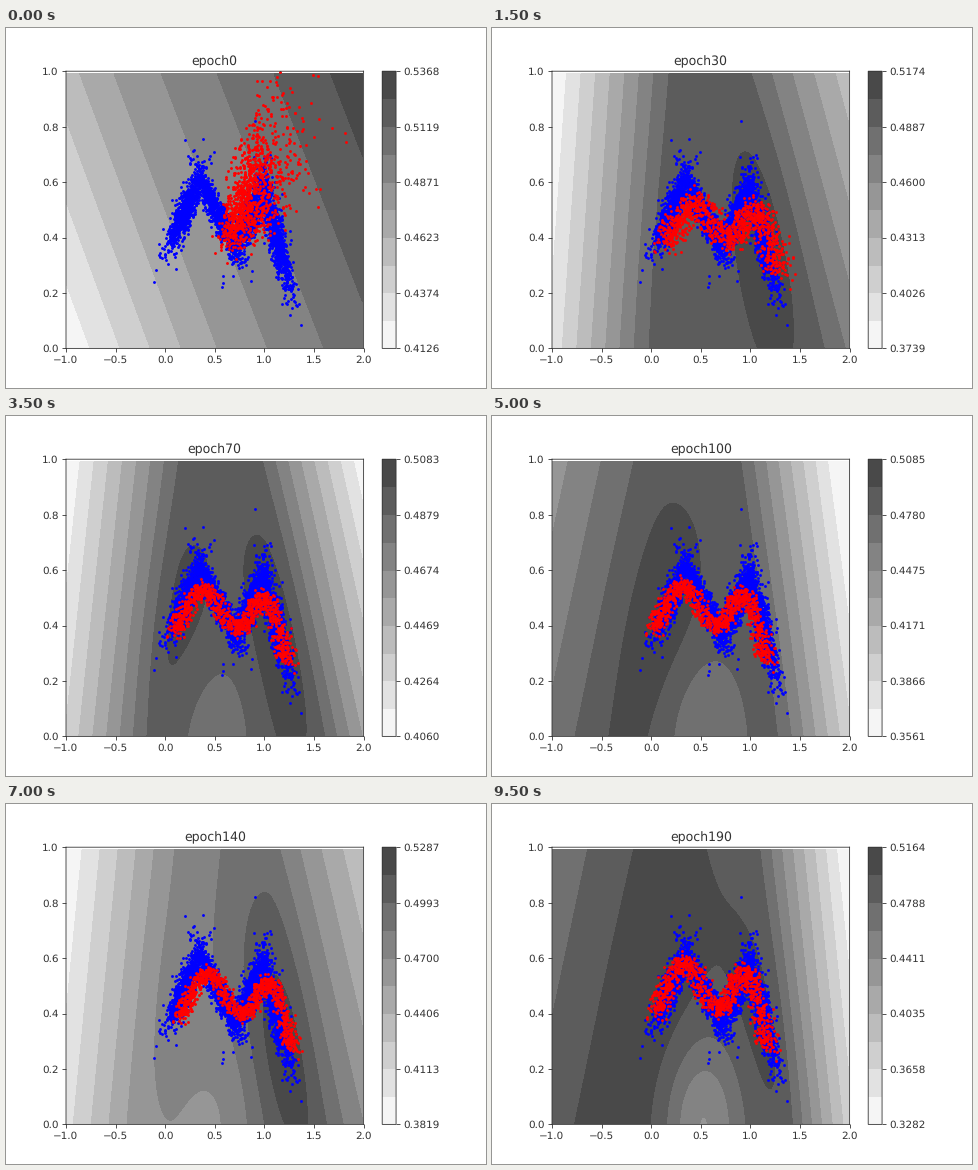
Animation, 480 px wide and 360 px high, one loop 10 s. Source, as a matplotlib script:

```python
import numpy as np
import matplotlib.pyplot as plt
from matplotlib.animation import FuncAnimation

FRAMES, INTERVAL = 20, 500
N_REAL, N_FAKE = 3200, 1000
INK = "0.2"
rng = np.random.default_rng(4)
plt.rcParams.update({
    "text.hinting": "no_hinting", "path.snap": False, "text.color": INK,
    "axes.edgecolor": INK, "xtick.color": INK, "ytick.color": INK})

# Key poses by epoch index:
#   values  lowest and highest label
#   left    ramp rising from the left edge: height, x slope, y slope
#   right   the same from the right edge
#   cap     plateau between the ramps: height, x slope
#   bumps   left ridge, right ridge, bottom hollow
#   red     shift x, shift y, squash, spread of the generated stroke
POSES = {
    0: dict(values=(0.41258, 0.53676), left=(0.2, 3.3, 3.4), right=(7.7, -1.75, 1.9),
            cap=(12, 0), bumps=(0, 0, 0), red=(0.03, 0, 0.7, 0.05)),
    3: dict(values=(0.3739, 0.5174), left=(1.3, 6.8, -1.3), right=(6.8, 4.6, -3.5),
            cap=(8.4, 0), bumps=(0.2, 1.2, 0), red=(0.08, -0.02, 0.72, 0.07)),
    7: dict(values=(0.40596, 0.50835), left=(2.1, 7, -2.1), right=(4.9, 7.5, -4.7),
            cap=(8.5, 0), bumps=(0.8, 1.0, 1.2), red=(0.02, -0.02, 0.77, 0.045)),
    10: dict(values=(0.3561, 0.5085), left=(7.3, 3, -1.8), right=(2.2, 8, -3),
             cap=(8.9, -0.6), bumps=(0.8, 0.2, 1.6), red=(-0.05, -0.01, 0.8, 0.045)),
    14: dict(values=(0.3819, 0.5287), left=(1.6, 5.5, -1.5), right=(6, 4.6, -3),
             cap=(6, 1.5), bumps=(0.4, 1.8, 0.9), red=(0.07, -0.01, 0.82, 0.04)),
    17: dict(values=(0.3464, 0.5034), left=(6.9, 3, -1.6), right=(2.2, 10, -2.6),
             cap=(8.6, 0), bumps=(0.9, 0.9, 2.8), red=(-0.02, -0.01, 0.85, 0.04)),
    19: dict(values=(0.3282, 0.5164), left=(8.5, 2.2, -1.3), right=(2.4, 9, -2.6),
             cap=(9.4, -0.9), bumps=(0.4, 0.9, 3), red=(-0.03, 0.015, 0.92, 0.05)),
}


def pose(i):
    """Blend every pose parameter at frame i."""
    times = list(POSES)
    return {name: np.array([np.interp(i, times, column) for column in
                            zip(*(p[name] for p in POSES.values()))])
            for name in POSES[0]}


X, Y = np.meshgrid(np.linspace(-1, 1.99, 150), np.linspace(0, 0.99, 100))


def bell(u, v):
    return np.exp(-(u ** 2 + v ** 2) / 2)


RIDGE_L = bell((X - 0.2 - 0.4 * (Y - 0.5)) / 0.28, (Y - 0.4) / 0.3)
RIDGE_R = bell((X - 1.05 + 0.4 * (Y - 0.5)) / 0.22, (Y - 0.3) / 0.35)
HOLLOW = bell((X - 0.5) / 0.28, Y / 0.22)


def field(p):
    def ramp(a, slope, tilt, distance):
        return a + slope * distance + tilt * Y

    planes = [ramp(*p["left"], X + 1), ramp(*p["right"], 2 - X),
              p["cap"][0] + p["cap"][1] * X]
    soft = 0.25
    level = -soft * np.log(sum(np.exp(-z / soft) for z in planes))
    left, right, hollow = p["bumps"]
    return np.clip(level + left * RIDGE_L + right * RIDGE_R - hollow * HOLLOW, 0.02, 9.98)


# Real samples: four Gaussian strokes forming an M
CORNERS = np.array([(0.05, 0.36), (0.345, 0.63), (0.715, 0.345), (0.99, 0.6), (1.24, 0.21)])
arm = rng.integers(0, 4, N_REAL)
along = rng.normal(0.5, 0.27, N_REAL)[:, None]
real = CORNERS[arm] + along * (CORNERS[arm + 1] - CORNERS[arm])
real += rng.normal(size=real.shape) * (0.045, 0.016)

# Generated samples: a loose cloud that gathers into a rounded M
u = rng.random(N_FAKE)
jitter = rng.normal(size=(N_FAKE, 2))
climb, drift = rng.gamma(2, 1, (N_FAKE, 1)), rng.gamma(1.6, 1, (N_FAKE, 1))
cloud = (0.55, 0.34) + climb * (0.06, 0.1) + drift * (0.14, 0.025) + 0.05 * jitter * (1, 0.6)


def along_m(t):
    return np.column_stack([np.interp(t * 4, range(5), c) for c in CORNERS.T])


rounded = sum(along_m(u + d) for d in (-0.07, 0, 0.07)) / 3


def generated(i, p):
    dx, dy, squash, spread = p["red"]
    stroke = (rounded - (0, 0.45)) * (1, squash) + (dx, 0.45 + dy)
    stroke = stroke + spread * jitter * (1, 0.36)
    loose = max(0, 1 - i / 3)
    return loose * cloud + (1 - loose) * stroke


greys = [str(1 - 0.75 * (k + 0.5) / 10) for k in range(10)]
levels = np.arange(11)
dots = dict(s=3, linewidths=1)

fig, ax = plt.subplots(figsize=(6.4, 4.8), dpi=75)
contours = ax.contourf(X, Y, field(pose(0)), levels, colors=greys)
bar = fig.colorbar(contours, ax=ax, ticks=levels[::2])
bar.outline.set_edgecolor(INK)
ax.scatter(*real.T, color="blue", zorder=2.1, **dots)
red = ax.scatter(*cloud.T, color="red", zorder=2.2, **dots)


def draw(i):
    global contours
    p = pose(i)
    contours.remove()
    contours = ax.contourf(X, Y, field(p), levels, colors=greys, zorder=1)
    bar.ax.set_yticks(levels[::2], [f"{v:.4f}" for v in np.linspace(*p["values"], 6)])
    red.set_offsets(generated(i, p))
    ax.set_title(f"epoch{10 * i}")
    ax.set(xlim=(-1, 2), ylim=(0, 1))
    return []


anim = FuncAnimation(fig, draw, frames=FRAMES, interval=INTERVAL,
                     init_func=lambda: draw(0), repeat=True, repeat_delay=0)
plt.show()
```
